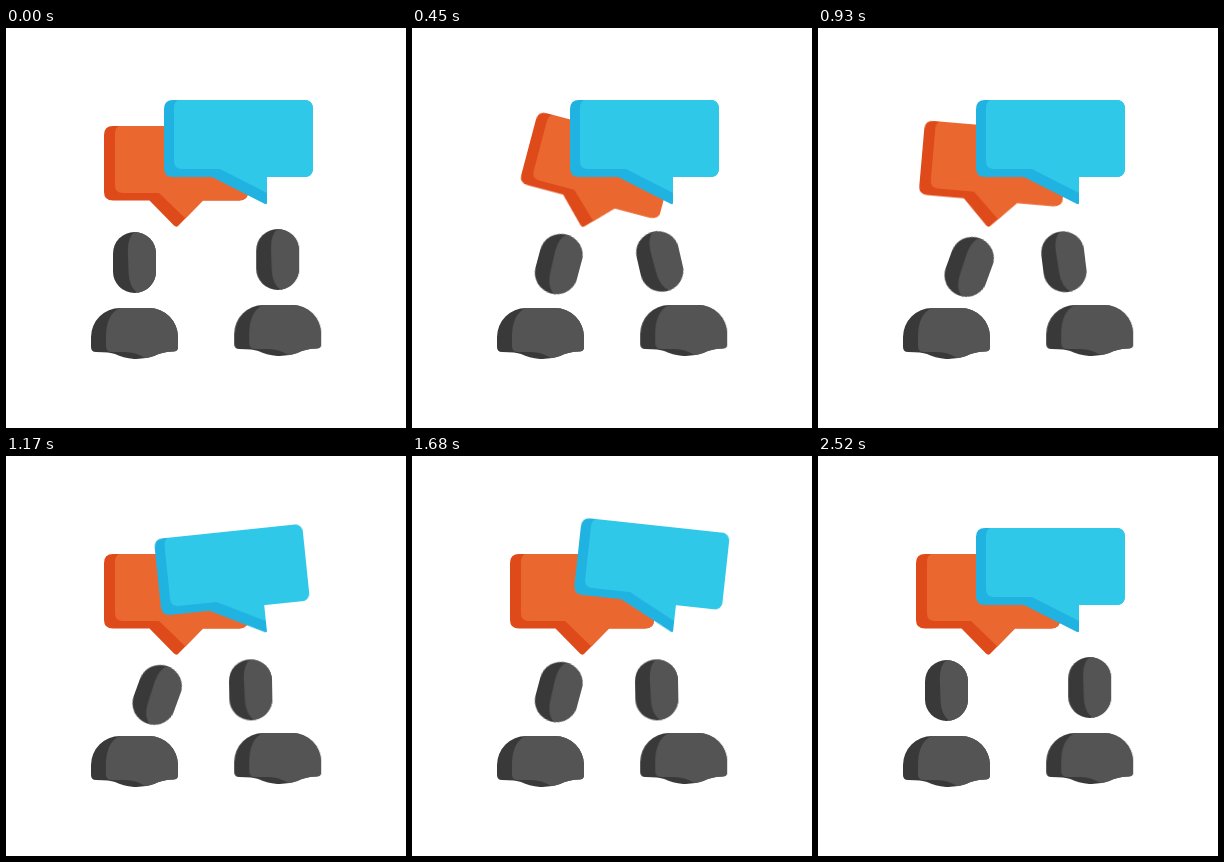
Write an HTML page without scripts that moves like this. It is 400 px wide and 400 px high and loops after 3550 ms.

```html
<!DOCTYPE html>
<html lang="en">
<head>
<meta charset="utf-8">
<title>Conversation</title>
<style>
  html, body { margin: 0; width: 100%; height: 100%; overflow: hidden; background: #fff; }
  svg { display: block; width: 100vw; height: 100vh; }

  .dark { fill: #393939; }
  .grey { fill: #545454; }
  .rust { fill: #de4a1a; }
  .orange { fill: #ea6830; }
  .azure { fill: #20b2e0; }
  .cyan { fill: #2fc8e9; }

  .move { animation: 3550ms cubic-bezier(.37, 0, .63, 1) infinite; }
  .reply { transform-origin: 170px 199px; animation-name: reply; }
  .speech { transform-origin: 261px 176px; animation-name: speech; }
  .lean, .nod { transform-origin: 128.5px 234.5px; }
  .lean { animation-name: lean; }
  .nod { animation-name: nod; }

  /* Damped swings about the bubble tips */
  @keyframes reply {
    0% { transform: rotate(0deg); }
    6.62% { transform: rotate(-20deg); }
    13.01% { transform: rotate(15deg); }
    19.72% { transform: rotate(-9.5deg); }
    25.92% { transform: rotate(5deg); }
    31.27%, 100% { transform: rotate(0deg); }
  }
  @keyframes speech {
    0%, 30.42% { transform: rotate(0deg); }
    37.41% { transform: rotate(-20deg); }
    45.01% { transform: rotate(15deg); }
    50.79% { transform: rotate(-10deg); }
    56.9% { transform: rotate(3.3deg); }
    64.79%, 100% { transform: rotate(0deg); }
  }

  /* Heads */
  @keyframes lean {
    0% { transform: translate(0, 0) rotate(0deg); }
    12.68% { transform: translate(18.2px, 1.5px) rotate(15deg); }
    19.44% { transform: translate(22px, 4.2px) rotate(19deg); }
    21%, 33.5% { transform: translate(22.6px, 4.3px) rotate(20deg); }
    45.5%, 58.6% { transform: translate(18.2px, 1.5px) rotate(15deg); }
    70.42%, 100% { transform: translate(0, 0) rotate(0deg); }
  }
  @keyframes nod {
    0% { transform: translate(0, 0) rotate(0deg); }
    12.68% { transform: translate(-24px, 2px) rotate(-13deg); }
    19.44% { transform: translate(-24.5px, 2.3px) rotate(-14deg); }
    32.4%, 47.9% { transform: translate(-27px, 2.3px) rotate(-1deg); }
    60.85%, 100% { transform: translate(0, 0) rotate(0deg); }
  }
</style>
</head>
<body>
<svg viewBox="0 0 400 400">
  <defs>
    <g id="head">
      <rect class="dark" x="107" y="204" width="43" height="61" rx="21.5"/>
      <path class="grey" d="M128.500 204A21.500 21.500 0 0 1 150 225.500V243.500A21.500 21.500 0 0 1 132 264.700Q123 260 122.500 243L121.800 222Q122 209 128.500 204Z"/>
    </g>
    <g id="body">
      <path class="dark" d="M85 309A29 29 0 0 1 114 280H143A29 29 0 0 1 172 309V319Q172 323.500 167 323.500Q157 323.500 148 328Q138 331.500 128 331Q117 330 109 326Q104 324 90 324Q85 324 85 319Z"/>
      <path class="grey" d="M100 309Q100 286 114 280H143A29 29 0 0 1 172 309V319Q172 323.500 167 323.500Q157 323.500 148 328Q143 330 139 330Q130 324 119 324H106Q100 324 100 318Z"/>
    </g>
  </defs>

  <g class="move reply">
    <path class="rust" d="M107 98H233Q242 98 242 107V164Q242 172.600 233 172.600H197L172 198Q170 199.500 168 197.500L143.500 172.600H107Q98 172.600 98 164V107Q98 98 107 98Z"/>
    <path class="orange" d="M113 98H233Q242 98 242 107V164Q242 172.600 233 172.600H197L179.500 190.500L153 165H117Q109 165 109 157V106Q109 100 113 98Z"/>
  </g>

  <g class="move speech">
    <path class="azure" d="M167 72H298Q307 72 307 81V140Q307 149 298 149H261V175Q261 177 258 175.500L206 149H167Q158 149 158 140V81Q158 72 167 72Z"/>
    <path class="cyan" d="M172 72H298Q307 72 307 81V140Q307 149 298 149H261V165L214 141H176Q168 141 168 133V80Q168 74 172 72Z"/>
  </g>

  <use href="#body"/>
  <use href="#head" class="move lean"/>
  <g transform="translate(143.200 -3)">
    <use href="#body"/>
    <use href="#head" class="move nod"/>
  </g>
</svg>
</body>
</html>
```
